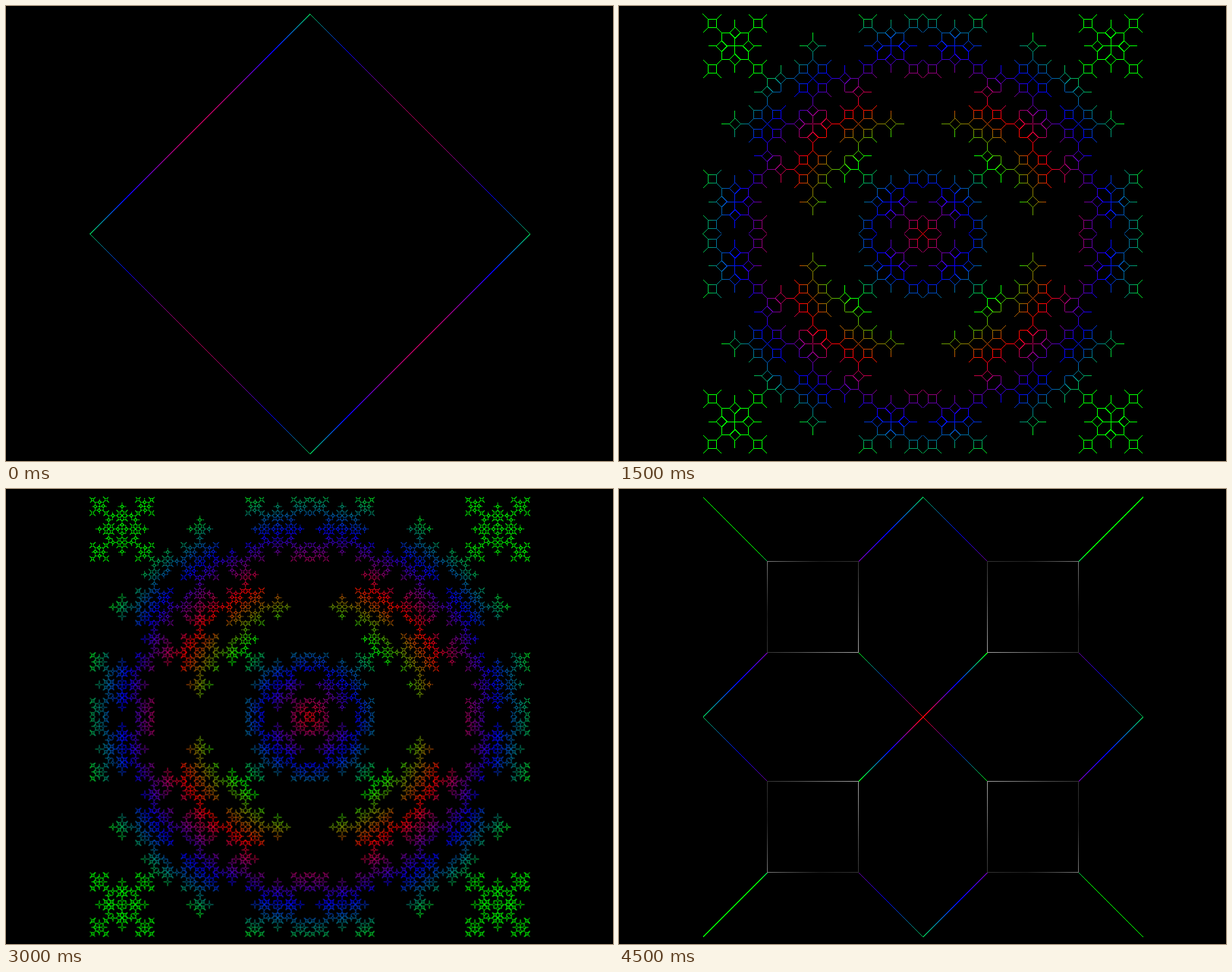
An HTML page without scripts that plays this animation: 800 px wide and 600 px high, repeating every 5 s.

```html
<!DOCTYPE html>
<html lang="en">
<head>
<meta charset="utf-8">
<title>Fractal lattice</title>
<style>
  html, body { margin: 0; width: 100%; height: 100%; overflow: hidden; background: #000; }
  svg { display: block; width: 800px; height: 600px; isolation: isolate; }
  path { fill: none; stroke: #fff; vector-effect: non-scaling-stroke; shape-rendering: crispEdges; }
  .tint { mix-blend-mode: multiply; }

  /* child crosses: one on a spoke, one on a side of the inner square */
  .spoke { transform: translate(.70711px, 0) scale(.29289); }
  .side { transform: translate(.20711px, .20711px) rotate(-45deg) scale(.29289); }

  .q1 { transform: rotate(90deg); }
  .q2 { transform: rotate(180deg); }
  .q3 { transform: rotate(270deg); }

  /* one cross on each edge of the diamond */
  .ne { transform: translate(145px, -145px) rotate(45deg) scale(205.061); }
  .se { transform: translate(145px, 145px) rotate(45deg) scale(205.061); }
  .sw { transform: translate(-145px, 145px) rotate(45deg) scale(205.061); }
  .nw { transform: translate(-145px, -145px) rotate(45deg) scale(205.061); }
</style>
</head>
<body>
<svg viewBox="0 0 800 600">
  <defs>
    <radialGradient id="hue" gradientUnits="userSpaceOnUse" cx="400.5" cy="300.5" r="307.5">
      <stop offset="0" stop-color="#f00"/>
      <stop offset=".2" stop-color="#00f"/>
      <stop offset=".4" stop-color="#0f0"/>
      <stop offset=".6" stop-color="#f00"/>
      <stop offset=".8" stop-color="#00f"/>
      <stop offset="1" stop-color="#0f0"/>
    </radialGradient>
    <radialGradient id="gray" gradientUnits="userSpaceOnUse" cx="400.5" cy="300.5" r="307.5">
      <stop offset="0" stop-color="#4c4c4c"/>
      <stop offset=".2" stop-color="#1d1d1d"/>
      <stop offset=".4" stop-color="#969696"/>
      <stop offset=".6" stop-color="#4c4c4c"/>
      <stop offset=".8" stop-color="#1d1d1d"/>
      <stop offset="1" stop-color="#969696"/>
    </radialGradient>

    <!-- each cross is four turned quarters; deeper quarters hold smaller crosses -->
    <path id="quarter1" d="M1 0H.41421L0 .41421"/>
    <g id="cross1">
      <use href="#quarter1"/><use href="#quarter1" class="q1"/>
      <use href="#quarter1" class="q2"/><use href="#quarter1" class="q3"/>
    </g>

    <path id="quarter2" d="M.41421 0h.17157M1 0h-.17157M.70711 .29289v-.17157M.70711-.29289v.17157
      M.58579 0l.12132-.12132 .12132 .12132-.12132 .12132z
      M0 0l.12132 .12132M.41421 .41421l-.12132-.12132M.41421 0l-.12132 .12132M0 .41421l.12132-.12132
      M.12132 .12132h.17157v.17157h-.17157z"/>
    <g id="cross2">
      <use href="#quarter2"/><use href="#quarter2" class="q1"/>
      <use href="#quarter2" class="q2"/><use href="#quarter2" class="q3"/>
    </g>

    <g id="quarter3"><use href="#cross2" class="spoke"/><use href="#cross2" class="side"/></g>
    <g id="cross3">
      <use href="#quarter3"/><use href="#quarter3" class="q1"/>
      <use href="#quarter3" class="q2"/><use href="#quarter3" class="q3"/>
    </g>

    <g id="quarter4"><use href="#cross3" class="spoke"/><use href="#cross3" class="side"/></g>
    <g id="cross4">
      <use href="#quarter4"/><use href="#quarter4" class="q1"/>
      <use href="#quarter4" class="q2"/><use href="#quarter4" class="q3"/>
    </g>

    <g id="quarter5"><use href="#cross4" class="spoke"/><use href="#cross4" class="side"/></g>
    <g id="cross5">
      <use href="#quarter5"/><use href="#quarter5" class="q1"/>
      <use href="#quarter5" class="q2"/><use href="#quarter5" class="q3"/>
    </g>

    <!-- lines shown without colour -->
    <path id="box" d="M-60-60H60V60H-60z"/>
    <path id="arm" d="M-60-60h35M60-60h-35M0-120v35M0-35v35"/>
    <path id="ridge" d="M0-85l25 25m-50 0l25 25"/>
    <path id="tip" d="M60-145l25 25m35 35l25 25"/>
    <g id="faint">
      <use href="#arm"/><use href="#arm" class="q1"/>
      <use href="#arm" class="q2"/><use href="#arm" class="q3"/>
      <use href="#ridge"/><use href="#ridge" y="120"/>
      <use href="#ridge" x="-60" y="60"/><use href="#ridge" x="60" y="60"/>
      <use href="#tip"/><use href="#tip" x="-205" y="205"/>
    </g>
    <path id="bars" d="M-25-265v35M-25-60v35M25-265v35M25-60v35M-60-25h35M25-25h35M-265-25h35M230-25h35"/>

    <mask id="gray1" maskUnits="userSpaceOnUse" x="0" y="0" width="800" height="600">
      <g transform="translate(400.68 300.68)">
        <use href="#box" x="145" y="-145"/><use href="#box" x="145" y="145"/>
        <use href="#box" x="-145" y="145"/><use href="#box" x="-145" y="-145"/>
      </g>
    </mask>
    <mask id="gray2" maskUnits="userSpaceOnUse" x="0" y="0" width="800" height="600">
      <g transform="translate(400.68 300.68)">
        <use href="#faint" x="145" y="-145"/><use href="#faint" x="145" y="145"/>
        <use href="#faint" x="-145" y="145"/><use href="#faint" x="-145" y="-145"/>
        <use href="#bars"/><use href="#bars" class="q2"/>
      </g>
    </mask>
  </defs>

  <rect width="800" height="600"/>

  <!-- coarse levels: the offset makes rising diagonals two pixels wide -->
  <g transform="translate(400.68 300.68)">
    <g>
      <path d="M0-290L290 0 0 290-290 0z"/>
      <animate attributeName="opacity" values="1;0;0;0;0;0;0;0;0;0" calcMode="discrete" dur="5s" repeatCount="indefinite"/>
    </g>
    <g opacity="0">
      <use href="#cross1" class="ne"/><use href="#cross1" class="se"/>
      <use href="#cross1" class="sw"/><use href="#cross1" class="nw"/>
      <animate attributeName="opacity" values="0;1;0;0;0;0;0;0;0;1" calcMode="discrete" dur="5s" repeatCount="indefinite"/>
    </g>
    <g opacity="0">
      <use href="#cross2" class="ne"/><use href="#cross2" class="se"/>
      <use href="#cross2" class="sw"/><use href="#cross2" class="nw"/>
      <animate attributeName="opacity" values="0;0;1;0;0;0;0;0;1;0" calcMode="discrete" dur="5s" repeatCount="indefinite"/>
    </g>
  </g>

  <!-- fine levels -->
  <g transform="translate(400.5 300.5)">
    <g opacity="0">
      <use href="#cross3" class="ne"/><use href="#cross3" class="se"/>
      <use href="#cross3" class="sw"/><use href="#cross3" class="nw"/>
      <animate attributeName="opacity" values="0;0;0;1;0;0;0;1;0;0" calcMode="discrete" dur="5s" repeatCount="indefinite"/>
    </g>
    <g opacity="0">
      <use href="#cross4" class="ne"/><use href="#cross4" class="se"/>
      <use href="#cross4" class="sw"/><use href="#cross4" class="nw"/>
      <animate attributeName="opacity" values="0;0;0;0;1;0;1;0;0;0" calcMode="discrete" dur="5s" repeatCount="indefinite"/>
    </g>
    <g opacity="0">
      <use href="#cross5" class="ne"/><use href="#cross5" class="se"/>
      <use href="#cross5" class="sw"/><use href="#cross5" class="nw"/>
      <animate attributeName="opacity" values="0;0;0;0;0;1;0;0;0;0" calcMode="discrete" dur="5s" repeatCount="indefinite"/>
    </g>
  </g>

  <rect class="tint" width="800" height="600" fill="url(#hue)"/>

  <rect width="800" height="600" fill="url(#gray)" mask="url(#gray1)" opacity="0">
    <animate attributeName="opacity" values="0;1;0;0;0;0;0;0;0;1" calcMode="discrete" dur="5s" repeatCount="indefinite"/>
  </rect>
  <rect width="800" height="600" fill="url(#gray)" mask="url(#gray2)" opacity="0">
    <animate attributeName="opacity" values="0;0;1;0;0;0;0;0;1;0" calcMode="discrete" dur="5s" repeatCount="indefinite"/>
  </rect>
</svg>
</body>
</html>
```
